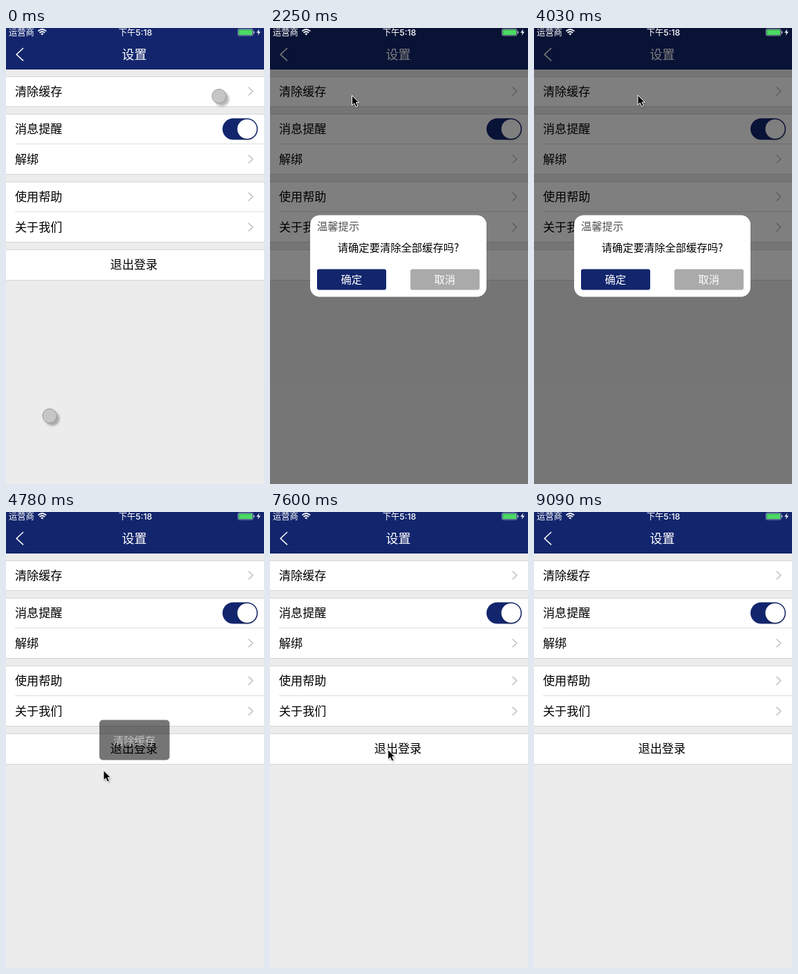
An HTML page that plays this animation: 373 px wide and 659 px high, repeating every 9.45 s.

```html
<!DOCTYPE html>
<html lang="zh-CN">
<head>
<meta charset="utf-8">
<title>设置</title>
<style>
html, body { margin: 0; width: 100%; height: 100%; overflow: hidden; background: #ececec; }
svg { display: block; width: 100%; height: 100%; }
text { font-family: "Noto Sans CJK SC", "Noto Sans CJK", sans-serif; }
</style>
</head>
<body>
<svg id="stage" viewBox="0 0 373 659"></svg>
<script>
const LOOP = 9450, STEP = 149;
const NAVY = '#13266d';
const stage = document.getElementById('stage');

const rect = (x, y, w, h, fill, r = 0, extra = '') =>
  `<rect x="${x}" y="${y}" width="${w}" height="${h}" rx="${r}" fill="${fill}" ${extra}/>`;

// y is the optical middle of the glyphs
const label = (s, x, y, size, fill = '#000', anchor = 'start', extra = '') =>
  `<text x="${x}" y="${y + size * 0.38}" font-size="${size}" fill="${fill}" text-anchor="${anchor}" ${extra}>${s}</text>`;

const line = (d, stroke, width, extra = '') =>
  `<path d="${d}" fill="none" stroke="${stroke}" stroke-width="${width}" ${extra}/>`;

const section = (top, bottom) =>
  rect(0, top, 373, bottom - top, '#d5d5d7') + rect(0, top + 1, 373, bottom - top - 2, '#fff');

const row = (s, y, arrow = true) => label(s, 13, y, 17.1) +
  (arrow ? line(`M350.5 ${y - 6}l6.2 6l-6.2 6`, '#c5c5c9', 1.7) : '');

const dot = (x, y) =>
  `<circle cx="${x + 4}" cy="${y + 4}" r="10.5" fill="#000" opacity=".28" filter="url(#blur)"/>
   <circle cx="${x}" cy="${y}" r="10.2" fill="#c6c6c6" stroke="#9c9c9c"/>`;

function settings() {
  return rect(0, 0, 373, 659, '#ececec') + rect(0, 0, 373, 60, NAVY) +
    line('M25 29L15.2 38.2L25 47.4', '#fff', 1.5) +
    label('设置', 185.5, 38, 18, '#fff', 'middle') +
    [[70, 114], [124, 212], [222, 310], [320, 365]].map(s => section(...s)).join('') +
    rect(13, 167, 360, 1, '#dedee0') + rect(13, 265, 360, 1, '#dedee0') +
    row('清除缓存', 91.5) + row('消息提醒', 145.5, false) + row('解绑', 189.5) +
    row('使用帮助', 243.8) + row('关于我们', 287.8) +
    label('退出登录', 185, 342, 17.1, '#000', 'middle') +
    rect(313, 130.5, 51, 31, NAVY, 15.5) +
    '<circle cx="349" cy="148" r="14" fill="#000" opacity=".2" filter="url(#blur)"/>' +
    '<circle cx="348.5" cy="146" r="14" fill="#fff"/>';
}

function statusBar() {
  return label('运营商', 4, 6.3, 12.3, '#fff') +
    line('M46.4 4.6Q52.3 -.6 58.2 4.6M48.5 6.9Q52.3 3.6 56.1 6.9', '#fff', 1.7) +
    '<path d="M50.3 8.4Q52.3 6.8 54.3 8.4L52.3 10.6Z" fill="#fff"/>' +
    label('下午5:18', 187, 6.3, 12.3, '#fff', 'middle', 'font-weight="500" style="font-family:Inter,\'Noto Sans CJK SC\',sans-serif"') +
    rect(335.5, 1.5, 21.5, 9.5, 'none', 1.5, 'stroke="#b9bfd2" stroke-width=".8"') +
    rect(336.5, 2.5, 19.5, 7.5, '#4cd964', 0.6) + rect(357.8, 4.5, 1.4, 3.5, '#b9bfd2', 0.6) +
    '<path d="M366.2 1.5L362.2 6.8H365L363.8 10.8L368 5.4H365.2Z" fill="#fff"/>';
}

function dialog(id, top, height, lines, firstLine) {
  const by = top + height - 40;
  const button = (s, x, fill) => rect(x, by, 100, 30, fill, 3) +
    label(s, x + 49.7, by + 15, 15.3, '#fff', 'middle');
  return `<g id="${id}">` + rect(58, top, 255, height, '#fff', 14) +
    label('温馨提示', 68, top + 15.7, 15.3, '#555') +
    lines.map((s, i) => label(s, 185.5, firstLine + i * 18, 15.3, '#000', 'middle')).join('') +
    button('确定', 68, NAVY) + button('取消', 203, '#aaa') + '</g>';
}

stage.innerHTML =
  '<defs><filter id="blur" x="-50%" y="-50%" width="200%" height="200%"><feGaussianBlur stdDeviation="1.5"/></filter></defs>' +
  settings() +
  `<g id="dots">${dot(308, 98.5)}${dot(63, 560.5)}</g>` +
  '<g id="toast">' + rect(135, 300.5, 101.5, 58, '#000', 5, 'fill-opacity=".54"') +
  '<text id="toastText" x="185.5" y="335.8" font-size="15.3" fill="#c4c4c4" text-anchor="middle"></text></g>' +
  rect(0, 0, 373, 659, '#000', 0, 'id="dim" fill-opacity=".5"') +
  dialog('clearBox', 270.5, 118, ['请确定要清除全部缓存吗?'], 317.5) +
  dialog('logoutBox', 261.5, 136, ['退出后不会删除任何历史数据，下', '次登录依然可以使用本账号。'], 308.5) +
  statusBar() +
  `<g id="cursor"><path d="M1 2V16L4.5 13L7 18L9.5 17L7.2 12H11.5Z" opacity=".35" filter="url(#blur)"/>
   <path d="M0 0V14.2L3.3 11.2L5.7 16.6L8.4 15.4L6.1 10.2H10.4Z" stroke="#fff" stroke-width="1"/></g>`;

const parts = {};
for (const id of ['dots', 'toast', 'toastText', 'dim', 'clearBox', 'logoutBox', 'cursor'])
  parts[id] = document.getElementById(id);

// [step, x, y] of the pointer tip
const path = [
  [2, 278, 454], [7, 118.5, 97.5], [16, 118.5, 97.5], [20, 252, 363], [21, 251, 360],
  [22, 248.8, 348.3], [26, 150, 97], [27, 150, 97], [31, 141, 373.5], [32, 141, 373.5],
  [37, 159, 342], [39, 159, 342], [41, 134, 364], [43, 151.5, 372.8], [44, 151.5, 372.8],
  [50, 170.5, 343.5], [52, 170.5, 343.5], [56, 241, 380], [57, 241, 380], [61, 365, 650]
];

function tipAt(n) {
  const i = Math.max(1, path.findIndex(p => p[0] >= n));
  const [n0, x0, y0] = path[i - 1], [n1, x1, y1] = path[i];
  const k = (n - n0) / (n1 - n0);
  return [x0 + (x1 - x0) * k, y0 + (y1 - y0) * k];
}

const within = (n, a, b) => n >= a && n < b;
const show = (el, on) => el.setAttribute('visibility', on ? 'visible' : 'hidden');

function render(ms) {
  const n = Math.floor((ms % LOOP) / STEP);
  const clearing = within(n, 15, 21) || within(n, 27, 32);
  const leaving = within(n, 39, 45) || within(n, 52, 58);
  show(parts.dots, n < 15);
  show(parts.clearBox, clearing);
  show(parts.logoutBox, leaving);
  show(parts.dim, clearing || leaving);

  const cleared = within(n, 32, 38);
  show(parts.toast, cleared || within(n, 45, 51));
  parts.toastText.textContent = cleared ? '清除缓存' : '退出登录';
  parts.toast.setAttribute('opacity', Math.min(1, ((cleared ? 38 : 51) - n) / 3));

  const moving = within(n, 2, 61);
  show(parts.cursor, moving);
  if (moving) parts.cursor.setAttribute('transform', `translate(${tipAt(n)})`);
}

const start = performance.now();
function tick() {
  render(performance.now() - start);
  requestAnimationFrame(tick);
}
tick();
</script>
</body>
</html>
```
